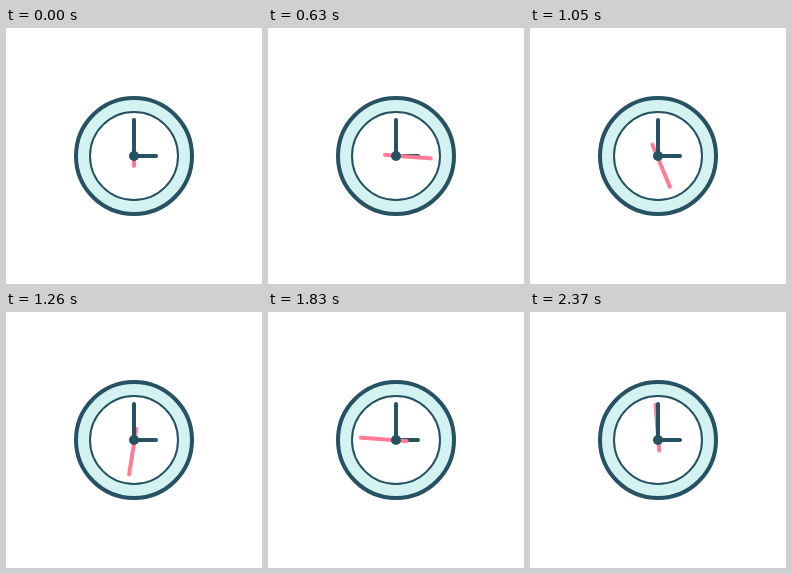
These frames come from a looping animation (256 by 256 pixels, 2400 ms). An HTML page without scripts:

```html
<!DOCTYPE html>
<html lang="en">
<head>
<meta charset="utf-8">
<title>Clock</title>
<style>
  html, body { margin: 0; width: 100%; height: 100%; overflow: hidden; background: #fff; }
  svg { display: block; width: 100%; height: 100%; }
  .dark { stroke: #265262; }
  .hand { stroke-width: 4; stroke-linecap: round; }
  .second { stroke: #ff7c93; animation: sweep 2400ms steps(20) infinite; }

  /* The hand turns about its own middle while that middle moves along a diamond. */
  @keyframes sweep {
    0%   { transform: translate(0px, -13px) rotate(0deg); }
    25%  { transform: translate(12.5px, 0px) rotate(90deg); }
    50%  { transform: translate(0px, 13px) rotate(180deg); }
    75%  { transform: translate(-13px, 0px) rotate(270deg); }
    100% { transform: translate(0px, -13px) rotate(360deg); }
  }
</style>
</head>
<body>
<svg viewBox="0 0 256 256">
  <g transform="translate(128 128)">
    <circle class="dark" r="58" fill="#d4f2f1" stroke-width="4"/>
    <circle class="dark" r="44" fill="#fff" stroke-width="2"/>
    <line class="dark hand" x2="22"/>
    <line class="second hand" y1="-23" y2="23"/>
    <line class="dark hand" y2="-36"/>
    <circle r="5" fill="#265262"/>
  </g>
</svg>
</body>
</html>
```
